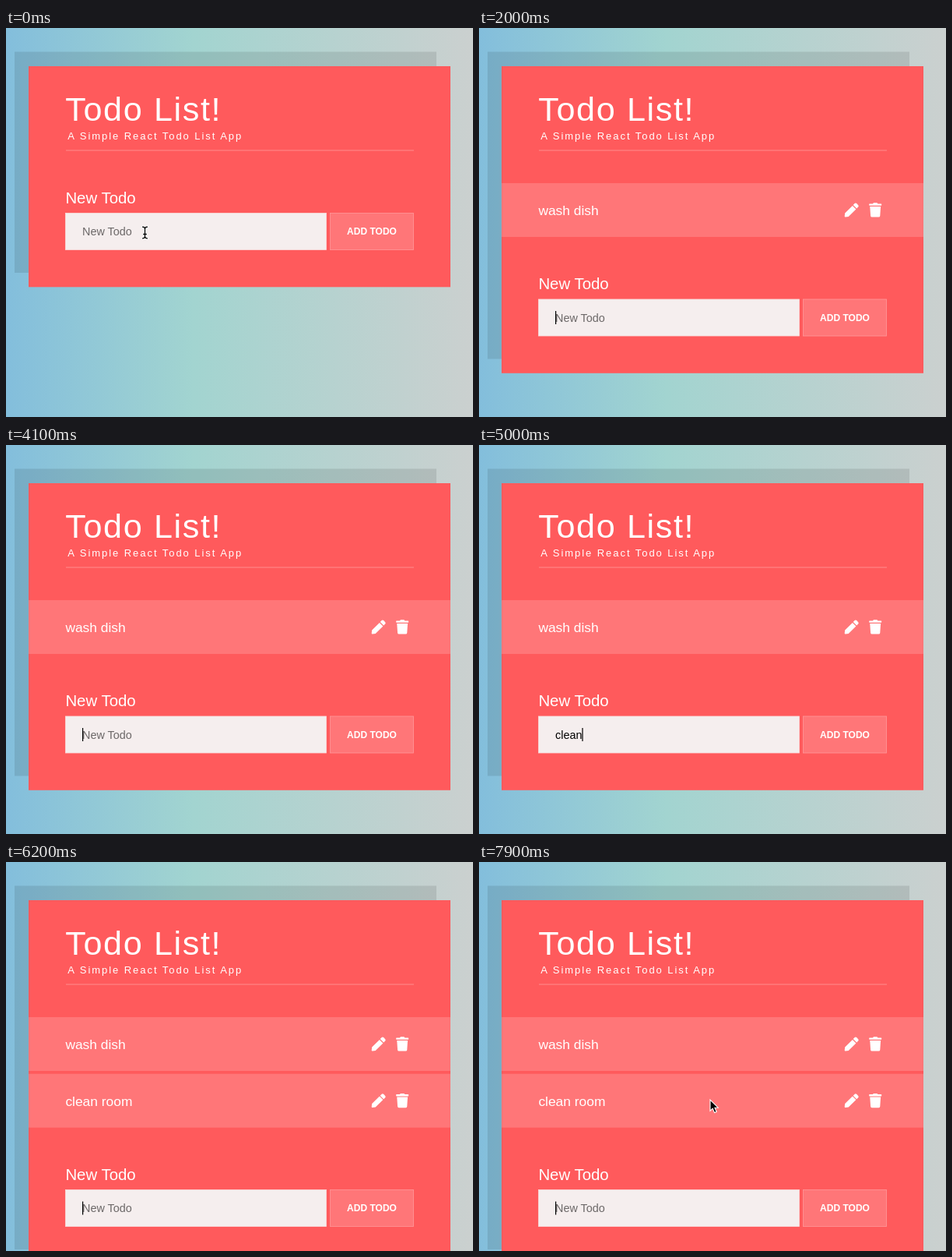
An HTML page that plays this animation: 600 px wide and 499 px high, repeating every 8 s.

```html
<!DOCTYPE html>
<html lang="en">
<head>
<meta charset="utf-8">
<title>Todo List</title>
<style>
  html, body { margin: 0; width: 100%; height: 100%; overflow: hidden; }
  svg { display: block; width: 600px; height: 499px; }
  text { font-family: "Liberation Sans", Arial, Helvetica, sans-serif; fill: #fff; white-space: pre; }
  .row text { font-size: 17.4px; }
  .field { font-size: 14.4px; }
</style>
</head>
<body>
<svg viewBox="0 0 600 499" xmlns="http://www.w3.org/2000/svg">
  <defs>
    <linearGradient id="sky">
      <stop offset="0" stop-color="#83bedc"/>
      <stop offset=".4" stop-color="#a2d4d0"/>
      <stop offset="1" stop-color="#cbd0cf"/>
    </linearGradient>
    <g id="icons" fill="#fff">
      <path transform="translate(469.7 224.6)" d="M10.2 3.3l4.5 4.5L5 17.3l-4 .5Q0 17.8 0 16.8l.5-4zM11 2.5l2-2q1.2-1 2.4 0l2.1 2.1q1 1.2 0 2.4l-2 2z"/>
      <path transform="translate(501.2 224.3)" d="M.6 1.1H4.8L5.2.5Q5.5 0 6 0H10Q10.5 0 10.8.5L11.2 1.1H15.4Q16 1.1 16 1.7V2.8Q16 3.4 15.4 3.4H.6Q0 3.4 0 2.8V1.7Q0 1.1.6 1.1zM1.1 4.6H14.9L14.1 16.6Q14 18.2 12.4 18.2H3.6Q2 18.2 1.9 16.6z"/>
    </g>
  </defs>
  <rect width="600" height="499" fill="url(#sky)"/>
  <rect id="shade" x="11" y="30.5" width="542" fill="#000" fill-opacity=".1"/>
  <rect id="card" x="29" y="49" width="542" fill="#ff5a5c"/>
  <text x="76.3" y="118.5" font-size="43.2" letter-spacing="1.6">Todo List!</text>
  <text x="79.3" y="143" font-size="13" letter-spacing="1.95">A Simple React Todo List App</text>
  <path d="M77 157H524" stroke="#fff" stroke-opacity=".3"/>
  <g id="rows"></g>
  <g id="form">
    <text x="76.4" y="224.5" font-size="20.4">New Todo</text>
    <rect x="76.5" y="237.5" width="335" height="47" fill="#f5eeee" stroke="#f9dcdc" stroke-width=".8"/>
    <text id="value" class="field" x="98" y="266"></text>
    <rect id="caret" y="252.5" width="1.2" height="17" fill="#000"/>
    <rect x="416.5" y="237.5" width="107" height="47" fill="#ff7678" stroke="#ff9294" stroke-width=".9"/>
    <text x="470" y="265.2" font-size="12" font-weight="700" text-anchor="middle">ADD TODO</text>
  </g>
  <g id="beam" transform="translate(178.5 262.5)" fill="none" stroke-linecap="round">
    <path id="beamShape" d="M-3 -7.3Q-.3 -7.3 0 -5.2Q.3 -7.3 3 -7.3M0 -5.5V5.5M-3 7.3Q-.3 7.3 0 5.2Q.3 7.3 3 7.3M-1.8 2H1.8" stroke="#fff" stroke-width="2.8"/>
    <use href="#beamShape"/>
    <path d="M-3 -7.3Q-.3 -7.3 0 -5.2Q.3 -7.3 3 -7.3M0 -5.5V5.5M-3 7.3Q-.3 7.3 0 5.2Q.3 7.3 3 7.3M-1.8 2H1.8" stroke="#000" stroke-width="1.3"/>
  </g>
  <path id="arrow" d="M0 0V14.2L3.2 11.2L5.6 16.6L8.2 15.5L5.9 10.2H10.2z" fill="#000" stroke="#fff" stroke-width="1.1"/>
</svg>
<script>
const LOOP = 8000;
const $ = id => document.getElementById(id);

// Each entry: text, times of its keystrokes, time it is added, row top
const todos = [
  { text: 'wash dish', keys: [700, 800, 900, 1000, 1100, 1200, 1300, 1500, 1600], add: 2000, top: 199 },
  { text: 'clean room', keys: [4400, 4500, 4600, 4700, 4800, 5300, 5400, 5500, 5700, 5800], add: 6200, top: 271.7 }
];
const shifts = [0, 110.5, 183];
const caretOff = [[0, 400], [2200, 2700], [3200, 3700], [4200, 4400], [6300, 6700], [7300, 7900]];
const moves = [[7800, 268, 271], [7900, 297, 305]];

$('rows').innerHTML = todos.map(({ text, top }) =>
  `<g class="row"><rect x="29" y="${top}" width="542" height="69" fill="#ff7678"/>
   <text x="76.4" y="${top + 41}">${text}</text>
   <use href="#icons" y="${top - 199}"/></g>`).join('');
const rows = [...document.querySelectorAll('.row')];

const show = (el, on) => el.setAttribute('visibility', on ? 'visible' : 'hidden');

function draw(t) {
  const count = todos.filter(d => t >= d.add).length;
  const shift = shifts[count];
  const next = todos[count];
  const typed = next ? next.text.slice(0, next.keys.filter(k => t >= k).length) : '';

  rows.forEach((row, i) => show(row, i < count));
  $('card').setAttribute('height', 283.3 + shift);
  $('shade').setAttribute('height', 283.5 + shift);
  $('form').setAttribute('transform', `translate(0 ${shift})`);

  const value = $('value');
  value.textContent = typed || 'New Todo';
  value.style.fill = typed ? '#000' : '#6c6868';
  $('caret').setAttribute('x', 98 + (typed ? value.getComputedTextLength() : 0));
  show($('caret'), !caretOff.some(([a, b]) => t >= a && t < b));

  show($('beam'), t < todos[0].keys[0]);
  const spot = moves.filter(m => t >= m[0]).pop();
  show($('arrow'), spot);
  if (spot) $('arrow').setAttribute('transform', `translate(${spot[1]} ${spot[2]})`);
}

let start;
function tick(now) {
  start ??= now;
  draw((now - start) % LOOP);
  requestAnimationFrame(tick);
}
draw(0);
requestAnimationFrame(tick);
</script>
</body>
</html>
```
